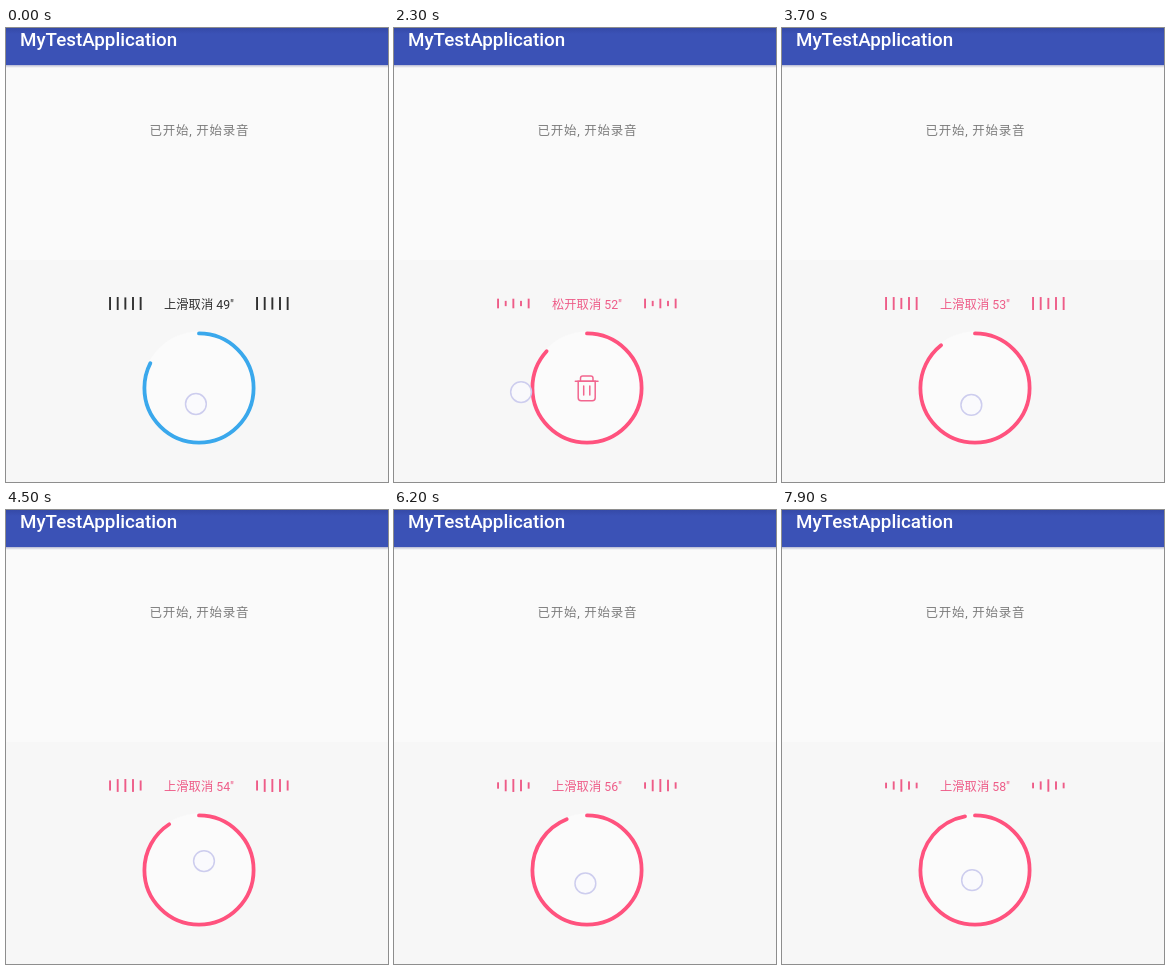
An HTML page with a canvas that plays this animation: 382x454 px, repeating every 8000 ms.

```html
<!DOCTYPE html>
<html lang="zh-CN">
<head>
<meta charset="utf-8">
<title>MyTestApplication</title>
<style>
html, body { margin: 0; width: 100%; height: 100%; overflow: hidden; background: #fafafa; }
canvas, svg { position: absolute; left: 0; top: 0; width: 382px; height: 454px; }
text { font-family: Roboto, "Noto Sans CJK SC", "Noto Sans CJK", sans-serif; }
.title { font-size: 18.8px; font-weight: 500; fill: #fff; }
.note { font-size: 12.5px; letter-spacing: 0.75px; fill: #7c7c7c; text-anchor: middle; }
.hint { font-size: 12.3px; text-anchor: middle; }
</style>
</head>
<body>
<canvas id="stage"></canvas>
<svg viewBox="0 0 382 454">
  <text class="title" x="14" y="17.5">MyTestApplication</text>
  <text class="note" x="193.3" y="106.8">已开始, 开始录音</text>
  <text class="hint" id="hint" x="193" y="281.3"></text>
</svg>
<script>
const W = 382, H = 454, LOOP = 8000, BEAT = 910;
const CX = 193, CY = 360, R = 54.6;
const BLUE = '#3aa8ec', PINK = '#ff527e', DARK = '#303030', ROSE = '#ee5c88';

const canvas = document.getElementById('stage');
const hint = document.getElementById('hint');
const ctx = canvas.getContext('2d');
const scale = window.devicePixelRatio || 1;
canvas.width = W * scale;
canvas.height = H * scale;

// turning points of the finger: time, x, y
const path = [
  [0, 190, 376], [1200, 88, 370], [1400, 102, 369], [2300, 127, 364],
  [3300, 185, 390], [4500, 198, 351], [5400, 192, 375], [LOOP, 190, 370]
];

function touchAt(t) {
  const i = path.findIndex(p => p[0] > t);
  const [t0, x0, y0] = path[i - 1], [t1, x1, y1] = path[i];
  const k = (t - t0) / (t1 - t0);
  return [x0 + (x1 - x0) * k, y0 + (y1 - y0) * k];
}

// a dip travels from the middle bar to the outer ones on every beat
function barHeight(phase, dist) {
  const lag = (phase - 0.33 - 0.2 * dist) / 0.22;
  return 13 - 7.7 * Math.exp(-lag * lag);
}

function line(x1, y1, x2, y2) {
  ctx.beginPath();
  ctx.moveTo(x1, y1);
  ctx.lineTo(x2, y2);
  ctx.stroke();
}

function disc(x, y, r, fill) {
  ctx.beginPath();
  ctx.arc(x, y, r, 0, Math.PI * 2);
  ctx.fillStyle = fill;
  ctx.fill();
}

function rect(x, y, w, h, fill) {
  ctx.fillStyle = fill;
  ctx.fillRect(x, y, w, h);
}

function fade(y, h, from, to) {
  const g = ctx.createLinearGradient(0, y, 0, y + h);
  g.addColorStop(0, from);
  g.addColorStop(1, to);
  rect(0, y, W, h, g);
}

function drawBackdrop() {
  rect(0, 0, W, H, '#fafafa');
  rect(0, 232, W, H - 232, '#f7f7f7');
  rect(0, 0, W, 37, '#3b52b6');
  fade(0, 6, 'rgba(30,40,110,0.2)', 'rgba(30,40,110,0)');
  fade(37, 3, 'rgba(70,80,150,0.4)', 'rgba(120,120,150,0)');
}

function drawBars(t, color) {
  const phase = (t % BEAT) / BEAT;
  for (const mid of [118.4, 265.4]) {
    for (let i = -2; i <= 2; i++) {
      const h = barHeight(phase, Math.abs(i));
      rect(mid + i * 7.65, 275.5 - h / 2, 1.9, h, color);
    }
  }
}

function drawRing(sec, color) {
  const top = -Math.PI / 2;
  disc(CX, CY, R + 1.9, '#fbfbfb');
  ctx.strokeStyle = color;
  ctx.lineWidth = 3.8;
  ctx.beginPath();
  ctx.arc(CX, CY, R, top, top + sec / 60 * Math.PI * 2);
  ctx.stroke();
}

function drawTrash() {
  ctx.strokeStyle = '#f2668f';
  ctx.lineWidth = 1.5;
  line(181.3, 353.3, 204, 353.3);
  ctx.beginPath();
  ctx.roundRect(186.5, 348, 12.5, 5.3, [2.2, 2.2, 0, 0]);
  ctx.roundRect(184.2, 353.3, 17, 19.4, [0, 0, 3, 3]);
  ctx.stroke();
  for (const x of [189.7, 195.8]) line(x, 358, x, 367);
}

function drawTouch(x, y) {
  disc(x, y, 10.4, 'rgba(250,250,253,0.75)');
  ctx.strokeStyle = '#cdcdee';
  ctx.lineWidth = 1.5;
  ctx.stroke();
}

function render(t) {
  const sec = 49.5 + t * 0.001107;
  const [x, y] = touchAt(t);
  const cancel = Math.hypot(x - CX, y - CY) > R;
  const pink = sec >= 50 || cancel;
  const ink = pink ? ROSE : DARK;

  ctx.setTransform(scale, 0, 0, scale, 0, 0);
  ctx.lineCap = 'round';
  drawBackdrop();
  drawBars(t, ink);
  drawRing(sec, pink ? PINK : BLUE);
  if (cancel) drawTrash();
  drawTouch(x, y);

  hint.setAttribute('fill', ink);
  hint.textContent = `${cancel ? '松开取消' : '上滑取消'} ${Math.floor(sec)}"`;
}

const start = performance.now();
function tick() {
  render((performance.now() - start) % LOOP);
  requestAnimationFrame(tick);
}
tick();
</script>
</body>
</html>
```
